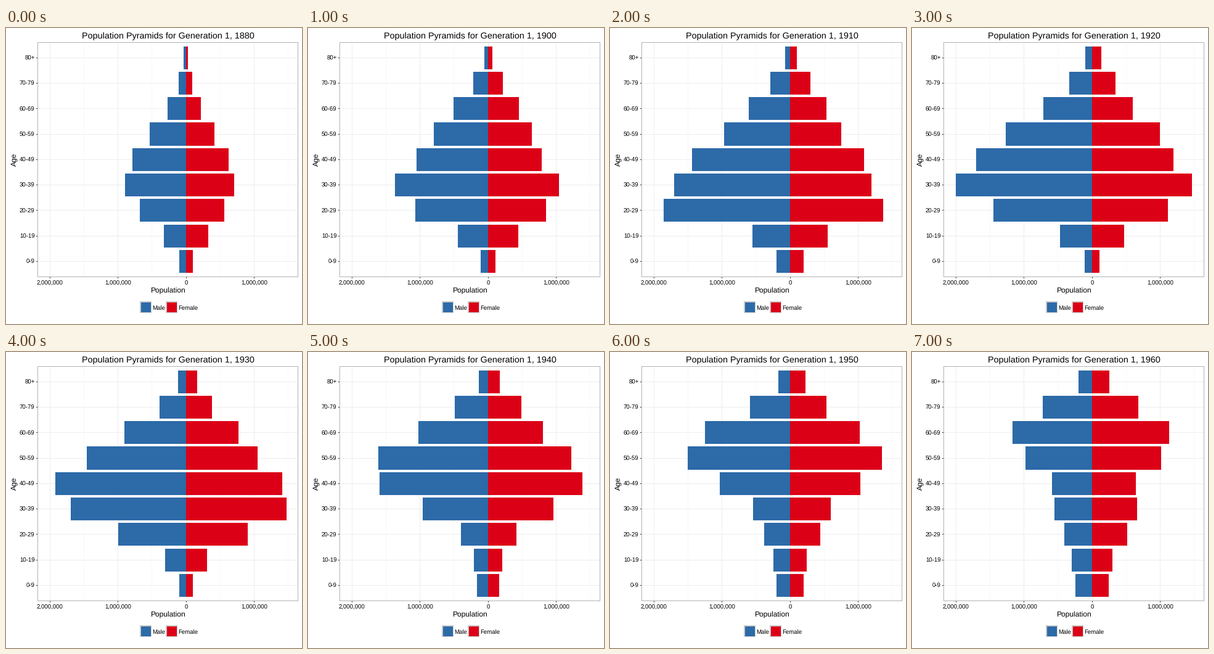
Animation of 480 by 480 pixels, one loop 8000 ms. Source, as a matplotlib script:

```python
import math

import matplotlib.pyplot as plt
from matplotlib.animation import FuncAnimation
from matplotlib.patches import Rectangle

plt.rcParams["font.family"] = "Liberation Sans"
plt.rcParams["text.hinting"] = "none"
plt.rcParams["toolbar"] = "None"

SIZE, DPI = 480, 80
BLUE, RED = "#2c6aa8", "#dc0017"
MAJOR, MINOR, BORDER, TICK = "#ededed", "#f8f8f8", "#b3b3b3", "#333333"
LEFT, RIGHT, TOP, BOTTOM = 51, 474, 23, 404
ZERO, MILLION = 292, 110.25
GROUPS = 9
AGES = [f"{10 * i}-{10 * i + 9}" for i in range(GROUPS - 1)] + ["80+"]

# Newcomers per decade, in pixels: children, teens, men in their twenties,
# men in their thirties, women per man, growth by migration.
ARRIVALS = {
    1880: (11, 36, 75, 99, 0.79, 0),
    1890: (12, 45, 95, 116, 0.75, 0),
    1900: (12, 49, 118, 151, 0.76, 0),
    1910: (22, 61, 205, 188, 0.70, 0.05),
    1920: (12, 52, 160, 221, 0.733, 0),
    1930: (11, 34, 110, 187, 0.87, -0.04),
    1940: (18, 23, 44, 106, 1.0, -0.06),
    1950: (22, 27, 42, 60, 1.1, 0.08),
    1960: (27, 33, 45, 61, 1.2, 0.08),
}
YEARS = [y for y in ARRIVALS if y != 1890]


def survival(k, loss, wear):
    """Share of a group, k decades past its thirties, that reaches the next."""
    return 1 - loss * k - wear * k * k


def pyramids(female, loss, wear):
    """Age each generation by ten years at a time, adding the newcomers."""
    result, old = {}, None
    for year, (kids, teens, twenties, thirties, ratio, growth) in ARRIVALS.items():
        if female:
            twenties *= 1.05 * ratio
            thirties *= ratio
        if old is None:
            older = [thirties * math.exp(-0.5 * (k / 1.95) ** 2)
                     for k in range(1, 6)]
        else:
            older = [old[3 + k] * (survival(k, loss, wear) + growth * (1 - k / 4))
                     for k in range(5)]
        old = [kids, teens, twenties, thirties, *older]
        result[year] = [round(v) for v in old]
    return result


MEN = pyramids(False, 0.10, 0.016)
WOMEN = pyramids(True, 0.07, 0.016)

fig = plt.figure(figsize=(SIZE / DPI, SIZE / DPI), dpi=DPI, facecolor="white")
ax = fig.add_axes([0, 0, 1, 1])
ax.set_xlim(0, SIZE)
ax.set_ylim(SIZE, 0)
ax.axis("off")


def box(x0, y0, x1, y1, color):
    patch = Rectangle((x0, y0), x1 - x0, y1 - y0, facecolor=color,
                      linewidth=0, antialiased=False)
    return ax.add_patch(patch)


def label(x, y, text, px, ha="center", va="baseline", **kw):
    return ax.text(x, y, text, fontsize=px * 72 / DPI, ha=ha, va=va,
                   color="black", **kw)


def bars(color):
    rows = []
    for i in range(GROUPS):
        top = 359.8 - 41.27 * i
        rows.append(box(ZERO, round(top), ZERO, round(top + 37.15), color))
    return rows


def draw_panel():
    for half in range(-4, 4):
        x = int(ZERO + half * MILLION / 2)
        box(x, TOP, x + 1, BOTTOM, MINOR if half % 2 else MAJOR)
    for i, age in enumerate(AGES):
        mid = 378.4 - 41.25 * i
        y = int(mid)
        box(LEFT, y, RIGHT, y + 1, MAJOR)
        box(LEFT - 2, y, LEFT + 1, y + 1, TICK)
        label(46.5, mid + 3.6, age, 9.6, ha="right")
    for m in range(-2, 2):
        x = int(ZERO + m * MILLION)
        box(x, BOTTOM - 1, x + 1, BOTTOM + 2, TICK)
        label(x + 0.3, 417, f"{abs(m) * 10**6:,}", 9.6)


def draw_border():
    box(LEFT, TOP, RIGHT, TOP + 1, BORDER)
    box(LEFT, BOTTOM - 1, RIGHT, BOTTOM, BORDER)
    box(LEFT, TOP, LEFT + 1, BOTTOM, BORDER)
    box(RIGHT - 1, TOP, RIGHT, BOTTOM, BORDER)


def draw_legend():
    for x, name, color in ((218, "Male", BLUE), (260, "Female", RED)):
        box(x - 1, 443, x + 18, 462, "#cccccc")
        box(x + 1, 445, x + 17, 461, color)
        label(x + 19.5, 457, name, 9.6, ha="left")


draw_panel()
male, female = bars(BLUE), bars(RED)
draw_border()
draw_legend()
label(262.6, 430, "Population", 12)
label(19, 213, "Age", 12, ha="right", va="center", rotation=90)
title = label(262.8, 17, "", 14.4)


def update(n):
    year = YEARS[n]
    title.set_text(f"Population Pyramids for Generation 1, {year}")
    for left, right, m, w in zip(male, female, MEN[year], WOMEN[year]):
        left.set_x(ZERO - m)
        left.set_width(m)
        right.set_width(w)
    return [title, *male, *female]


anim = FuncAnimation(fig, update, frames=len(YEARS), interval=1000,
                     repeat=True, repeat_delay=0, blit=False)
plt.show()
```
